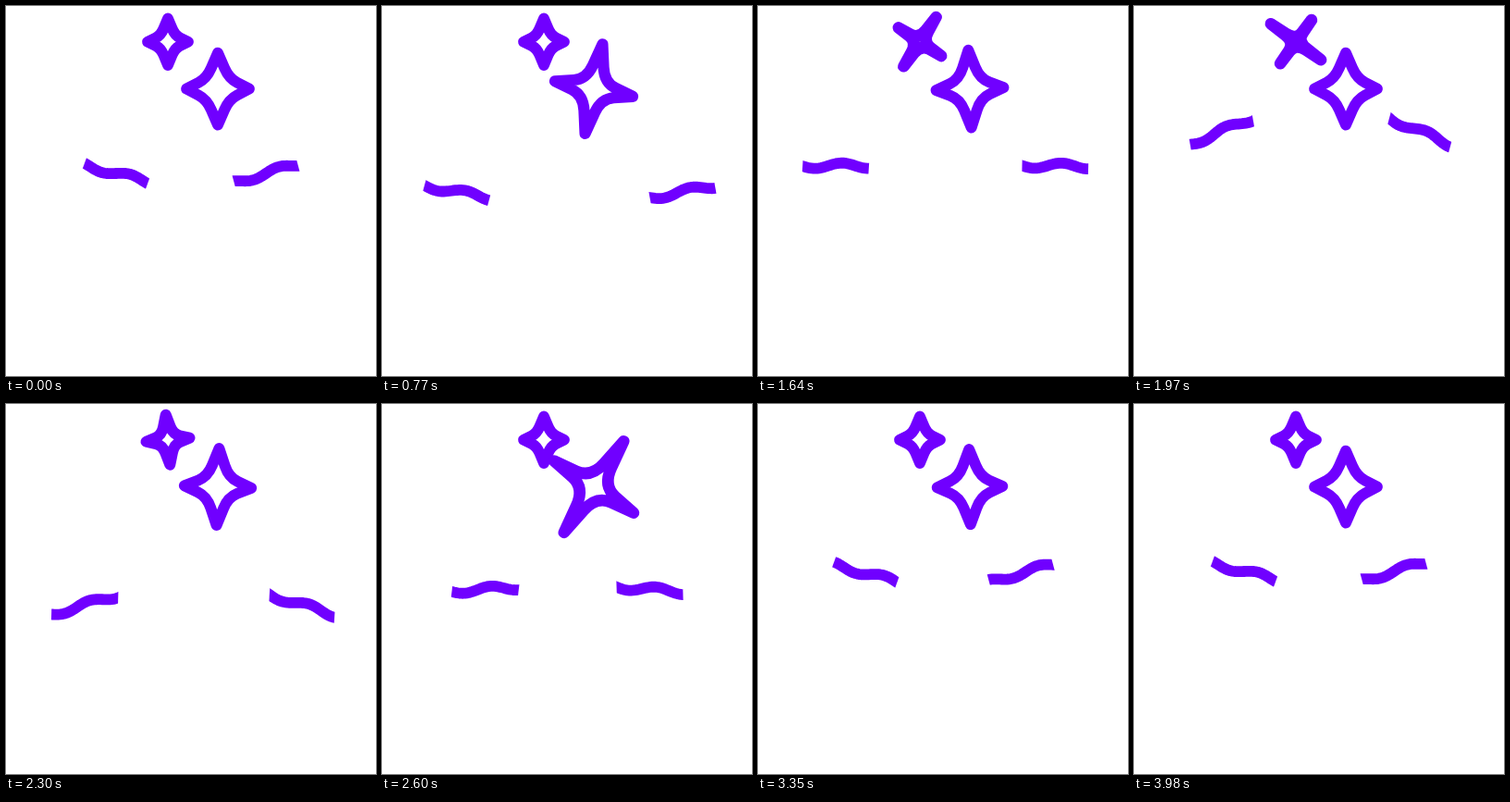
Recreate the animation shown at these times as an HTML page with a canvas. Size 400 by 400 pixels, loop 4.01 s.

```html
<!DOCTYPE html>
<html lang="en">
<head>
<meta charset="utf-8">
<title>Sparkling toast</title>
<style>
  html, body { margin: 0; width: 100%; height: 100%; overflow: hidden; background: #fff; }
  canvas { display: block; width: 100vmin; height: 100vmin; margin: 0 auto; }
</style>
</head>
<body>
<canvas id="stage"></canvas>
<script>
const LOOP = 4010;
const COLOR = '#7000ff';
const LINE = 11.8;
const RAD = Math.PI / 180;

const canvas = document.getElementById('stage');
const ctx = canvas.getContext('2d');

const mix = (a, b, k) => a + (b - a) * k;
const clamp = x => Math.min(1, Math.max(0, x));
const smooth = k => k * k * (3 - 2 * k);
const ramp = (t, from, to) => smooth(clamp((t - from) / (to - from)));
const hill = (t, mid, reach) => smooth(clamp(1 - Math.abs(t - mid) / reach));

// Symmetric ease with handles at .55 and .45
function ease(x) {
  if (x <= 0 || x >= 1) return clamp(x);
  let lo = 0, hi = 1;
  for (let i = 0; i < 24; i++) {
    const s = (lo + hi) / 2, r = 1 - s;
    if (1.65 * s * r * r + 1.35 * s * s * r + s * s * s < x) lo = s; else hi = s;
  }
  return smooth(lo);
}

// Sparkles: half axes, corner point at rest and stretched, start times
const SPIN = 1263;
const stars = [
  { x: 175, y: 38.7, h: 25.3, w: 22, rest: [7.6, 7], thin: [0.8, 0.2], grow: 0.35, starts: [1220] },
  { x: 229, y: 89.6, h: 39, w: 34, rest: [12, 11.4], thin: [6.2, 4.6], grow: 0.69, starts: [507, 2181] }
];

function drawStar(star, t) {
  const start = star.starts.find(s => t >= s && t < s + SPIN);
  const p = start === undefined ? 0 : (t - start) / SPIN;
  const k = hill(p, 0.5, 0.5);
  const scale = 1 + star.grow * k;
  const h = star.h * scale, w = star.w * scale;
  const cx = mix(star.rest[0], star.thin[0], k);
  const cy = mix(star.rest[1], star.thin[1], k);
  const tips = [[0, -h], [w, 0], [0, h], [-w, 0]];
  const corners = [[cx, -cy], [cx, cy], [-cx, cy], [-cx, -cy]];

  ctx.save();
  ctx.translate(star.x, star.y);
  ctx.rotate(ease(p) * Math.PI);
  ctx.lineWidth = LINE + k;
  ctx.beginPath();
  ctx.moveTo(...tips[0]);
  corners.forEach((c, i) => {
    const a = tips[i], b = tips[(i + 1) % 4];
    ctx.lineTo(mix(a[0], c[0], 0.6), mix(a[1], c[1], 0.6));
    ctx.quadraticCurveTo(c[0], c[1], mix(b[0], c[0], 0.6), mix(b[1], c[1], 0.6));
    ctx.lineTo(...b);
  });
  ctx.closePath();
  ctx.stroke();
  ctx.restore();
}

// Both glasses share one swing: time, distance outward, distance down
const swing = [
  [515, 0, 0],
  [770, 41, 21],
  [1050, 61, 28],
  [1340, 53, 27],
  [1970, 26, -44],
  [2270, 37, 38],
  [2600, 8, 21],
  [2930, -2, 6],
  [3300, 3, 1],
  [3900, 0, 0]
];

// Smooth curve through the key points without overshoot
function along(keys, t, c) {
  const last = keys.length - 1;
  if (t <= keys[0][0]) return keys[0][c];
  if (t >= keys[last][0]) return keys[last][c];
  const i = keys.findIndex(k => k[0] > t) - 1;
  const span = keys[i + 1][0] - keys[i][0];
  const u = (t - keys[i][0]) / span;
  const rate = n => (keys[n + 1][c] - keys[n][c]) / (keys[n + 1][0] - keys[n][0]);
  const slope = n => {
    if (n === 0 || n === last) return 0;
    const p = rate(n - 1), q = rate(n);
    return p * q <= 0 ? 0 : 2 * p * q / (p + q);
  };
  return mix(keys[i][c], keys[i + 1][c], smooth(u)) +
    span * u * (1 - u) * ((1 - u) * slope(i) - u * slope(i + 1));
}

// How far a glass turns from its rest, and the liquid against the glass
const turn = t => 5 * (hill(t, 2930, 300) - hill(t, 800, 300)) -
  30 * hill(t, 1970, 700) - 13 * hill(t, 2560, 350);
const slosh = t => 13 * hill(t, 1250, 450) - 14 * hill(t, 2250, 650) +
  11 * hill(t, 2930, 300) - 2;
const flow = t => -45 + 50 * ramp(t, 515, 900) + 310 * ramp(t, 2550, 3550);

const glasses = [
  { side: -1, reach: 0.93, lean: 20 },
  { side: 1, reach: 1.07, lean: 15 }
];

function drawWave({ side, reach, lean }, t) {
  const half = 36, wall = 35.8, amp = 3;
  const ripple = u => Math.sin((450 * u + flow(t)) * RAD);
  const first = ripple(0), end = ripple(1);

  ctx.save();
  ctx.translate(200 + side * (81 + reach * along(swing, t, 1)), 181 + along(swing, t, 2));
  ctx.rotate(-side * (lean + turn(t)) * RAD);
  ctx.beginPath();
  ctx.rect(-wall, -80, wall * 2, 160);
  ctx.clip();
  ctx.rotate(-side * slosh(t) * RAD);
  ctx.beginPath();
  for (let d = -52; d <= 52; d += 2) {
    const u = (d + half) / (2 * half);
    ctx.lineTo(d, amp * (ripple(u) - mix(first, end, u)));
  }
  ctx.stroke();
  ctx.restore();
}

function frame(now) {
  const t = now % LOOP;
  const size = Math.round(canvas.clientWidth * (window.devicePixelRatio || 1)) || 400;
  if (canvas.width !== size) canvas.width = canvas.height = size;
  ctx.setTransform(size / 400, 0, 0, size / 400, 0, 0);
  ctx.fillStyle = '#fff';
  ctx.fillRect(0, 0, 400, 400);
  ctx.strokeStyle = COLOR;
  ctx.lineWidth = LINE;
  ctx.lineJoin = ctx.lineCap = 'round';
  glasses.forEach(glass => drawWave(glass, t));
  stars.forEach(star => drawStar(star, t));
}

const begin = performance.now();
function tick() {
  frame(performance.now() - begin);
  requestAnimationFrame(tick);
}
tick();
</script>
</body>
</html>
```
